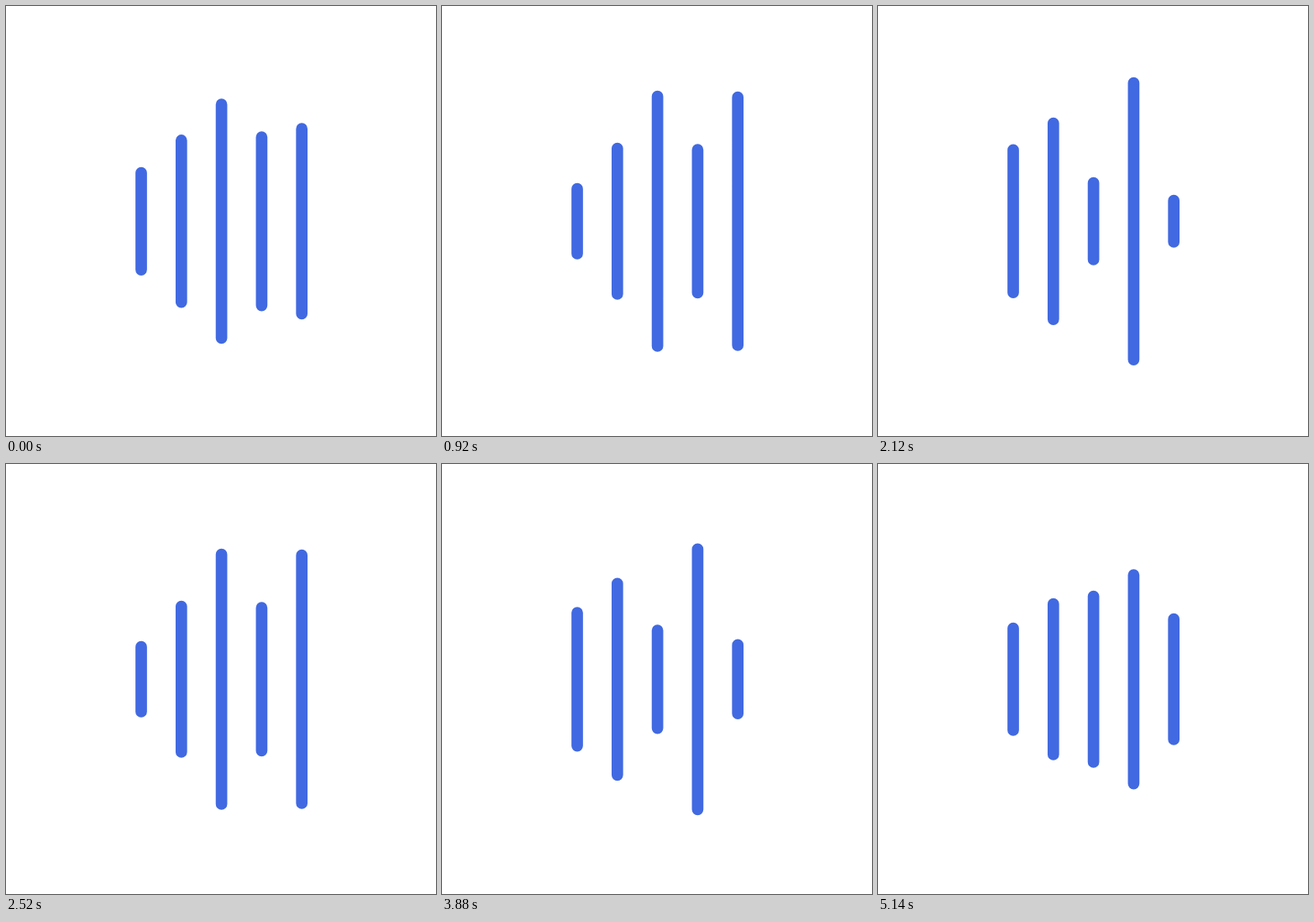
An HTML page with a canvas for the animation above (5160 ms loop, 512 px wide and 512 px high).

```html
<!DOCTYPE html>
<html lang="en">
<head>
<meta charset="utf-8">
<title>Bars</title>
<style>
  html, body { margin: 0; width: 100%; height: 100%; overflow: hidden; background: #fff; }
  canvas { display: block; width: 512px; height: 512px; }
</style>
</head>
<body>
<canvas id="stage" width="512" height="512"></canvas>
<script>
const ctx = document.getElementById('stage').getContext('2d');

const LOOP = 5160, STEP = 20;
const CYCLE = 1600, SEG = CYCLE / 4, OFFSET = 226;
const MID_Y = 256.3, FIRST_X = 161, GAP = 47.8, WIDTH = 13.7;

// Bar lengths at the four stops of a cycle
const bars = [
  [85.7, 188, 86.4, 247],
  [137.5, 252.4, 184, 392],
  [319.6, 95, 321.2, 217.5],
  [179.2, 351, 176, 308.5],
  [253.3, 54, 321, 181.5]
];

const bezier = (a, b, u) =>
  3 * a * u * (1 - u) ** 2 + 3 * b * u * u * (1 - u) + u ** 3;

// CSS "ease": cubic-bezier(.25, .1, .25, 1)
function ease(p) {
  let lo = 0, hi = 1;
  for (let i = 0; i < 24; i++) {
    const u = (lo + hi) / 2;
    if (bezier(0.25, 0.25, u) < p) lo = u; else hi = u;
  }
  return bezier(0.1, 1, lo);
}

function draw(ms) {
  const t = Math.floor(((ms + 1) % LOOP) / STEP) * STEP;
  const phase = (t - OFFSET + CYCLE) % CYCLE;
  const k = Math.floor(phase / SEG);
  const q = ease(phase / SEG - k);

  ctx.fillStyle = '#fff';
  ctx.fillRect(0, 0, 512, 512);
  ctx.strokeStyle = '#4169e1';
  ctx.lineWidth = WIDTH;
  ctx.lineCap = 'round';
  ctx.beginPath();
  bars.forEach((stops, i) => {
    const from = stops[k], to = stops[(k + 1) % 4];
    const half = (from + (to - from) * q - WIDTH) / 2;
    const x = FIRST_X + GAP * i;
    ctx.moveTo(x, MID_Y - half);
    ctx.lineTo(x, MID_Y + half);
  });
  ctx.stroke();
}

const start = performance.now();
function tick() {
  draw(performance.now() - start);
  requestAnimationFrame(tick);
}
tick();
</script>
</body>
</html>
```
